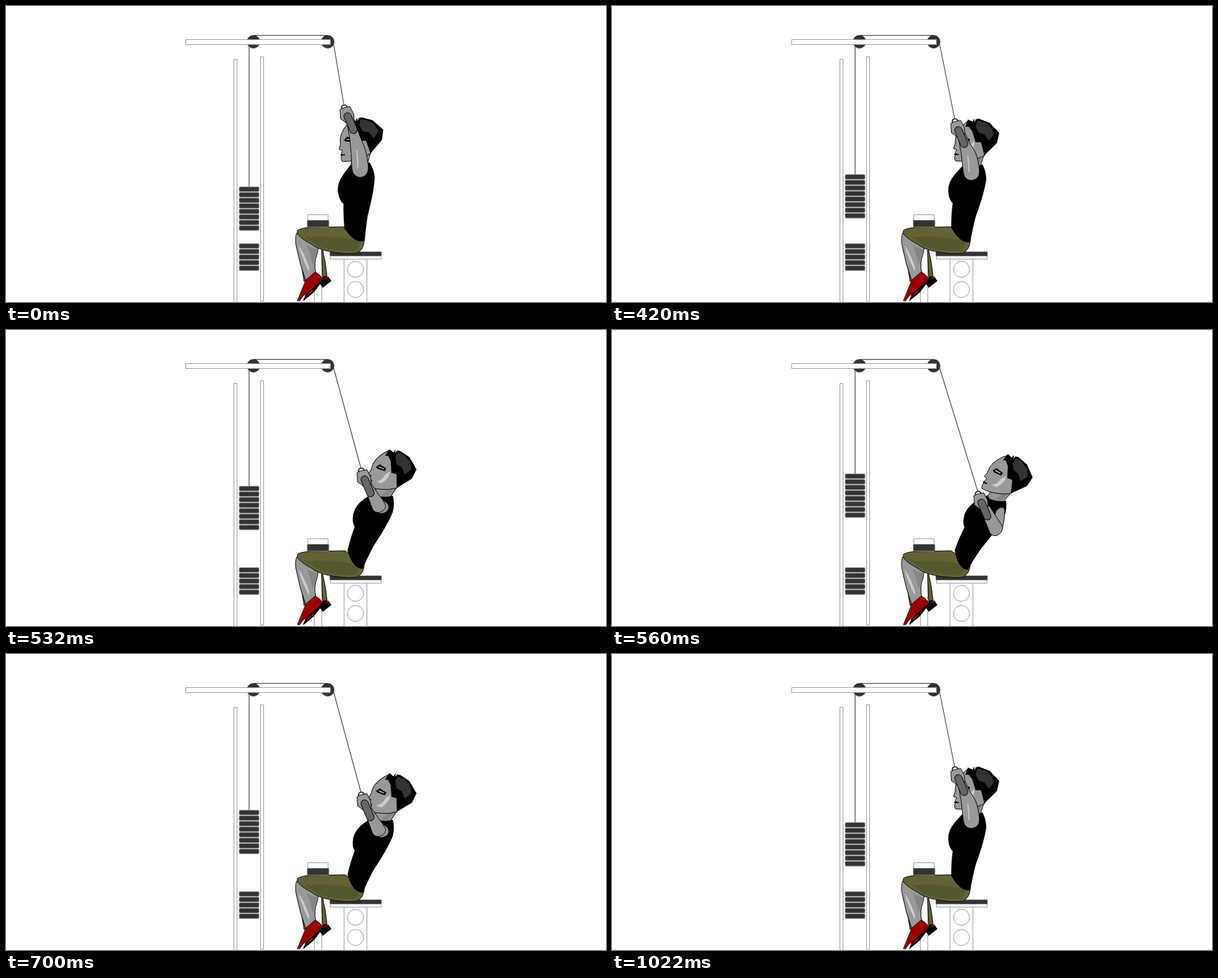
Recreate the animation shown at these times as an HTML page. Size 970 by 480 pixels, loop 1190 ms.

```html
<!DOCTYPE html>
<html lang="en">
<head>
<meta charset="utf-8">
<title>Lat pulldown</title>
<style>
  html, body { margin: 0; width: 100%; height: 100%; overflow: hidden; background: #fff; }
  svg { display: block; }
  .frame { fill: #fff; stroke: #999; }
  .pad { fill: #333; stroke: #888; }
  .cable { fill: none; stroke: #444; stroke-width: 1.2; }
  .skin { fill: #999; stroke: #000; }
  .shade { fill: #858585; }
  .shine { fill: #ccc; }
  .olive { fill: #626235; stroke: #000; }
  .red { fill: #900; stroke: #000; stroke-width: .8; }
</style>
</head>
<body>
<svg width="970" height="480" viewBox="0 0 970 480" stroke-linejoin="round">
  <!-- machine -->
  <g class="frame">
    <rect x="368.5" y="86.5" width="5" height="400"/>
    <rect x="411.5" y="82.5" width="5" height="396"/>
    <rect x="498.5" y="380.5" width="12" height="110"/>
    <rect x="546.5" y="405.5" width="37" height="90"/>
    <circle cx="565" cy="427" r="13"/>
    <circle cx="565" cy="459.7" r="13"/>
    <rect x="524.5" y="405.5" width="82" height="5"/>
  </g>
  <rect class="pad" x="523.5" y="398.5" width="83.5" height="7" rx="1"/>
  <circle cx="400" cy="58" r="10.7" fill="#333"/>
  <circle cx="520" cy="58" r="10.7" fill="#333"/>
  <path class="cable" d="M400 47.7H520"/>
  <path class="cable" id="cable"/>
  <rect class="frame" x="290.5" y="54.5" width="234" height="8"/>
  <g id="lifted"></g>
  <g id="resting" transform="translate(0 385)"></g>

  <!-- legs -->
  <path class="olive" d="M510 396L512 441L519 438Q517 416 512 396ZM474 400L482 447L489 443Z"/>
  <path d="M480 479L484 468L514 438L522 440L526 446L512 457L508 451L498 464Z"/>
  <path class="red" d="M483 474L488 466L497 459V463ZM513 441L521 439V444Z"/>
  <path class="skin" d="M470 368Q466 378 470 393Q475 420 485 446L501 434Q497 416 503 402L505 390Q488 385 480 374Z"/>
  <path class="shade" d="M486 388Q492 401 496 421L503 395Z"/>
  <path class="shine" d="M473 388Q478 408 490 431L490 424Q482 400 473 388Z"/>
  <path d="M489 464L512 442L516 446L511 453L505 450Z"/>
  <path class="red" d="M471 478L484 446L486 443L500 431Q509 436 512 443L490 463Q480 469 475 478Z"/>
  <path class="olive" d="M471 364Q476 360 492 359L548 358L579 378Q580 394 567 401Q543 403 518 397Q502 393 495 387Q475 376 471 369Z"/>
  <path fill="#57572c" d="M477 366Q482 376 492 375Q520 372 550 377L571 380Q571 394 560 397Q535 398 512 392Q500 388 494 381Q482 375 477 366Z"/>
  <rect class="frame" x="487.8" y="338.5" width="33" height="9"/>
  <rect class="pad" x="487" y="347.5" width="35" height="11" rx="1"/>

  <!-- torso and head lean as one -->
  <g id="body">
    <path class="skin" d="M612 262L606 272L612 282H634V277L645 264Z"/>
    <path class="shade" d="M618 275L632 265H642L633 274L628 277Z"/>
    <path class="skin" d="M640 203Q620 209 611 222L607 231L602 237Q603 239 606 240.5L603 244L601 247L598 253V257Q612 265 633 266L645 265L652 230Z"/>
    <path d="M600 245L607 248.5L606 250L600 247.5ZM615 227.5L622 224L632 232L629 236L618 231Z"/>
    <path d="M619.5 227.5L628 232.5" stroke="#ccc" stroke-width="1.6"/>
    <path class="shine" d="M637 237Q636 248 621 255L613 251Q624 250 628 242Z"/>
    <path d="M632 211L640 201L646 207L650 203L649 209L652 205L657 206L671 218L680 239L671 253L645 265L647 243L639 240L640 221L637 212Z"/>
    <path fill="#333" d="M653 208L663 214L671 225L672 238L660 245L657 233L649 227L648 216Z"/>
    <path d="M607 268L611 274Q624 279 637 277Q639 290 634 303Q624 322 597 354Q584 373 575 389Q559 387 554 357Q561 337 570 320Q566 313 570 299Q575 285 590 277Z"/>
  </g>

  <!-- arm -->
  <path class="skin" id="shoulder"/>
  <path class="skin" id="arm"/>
  <path id="gleam" fill="none" stroke="#ccc" stroke-width="1.8"/>
  <g id="grip">
    <circle cx="547" cy="165" r="4.5" fill="none" stroke="#333" stroke-width="2.2"/>
    <path class="skin" d="M540 168L546 165L556 163L562 175L563 186L550 190L547 187L541 183Z"/>
    <rect x="-6" y="-18" width="12" height="36" rx="6" transform="translate(557 190) rotate(-23)" fill="#666" stroke="#000"/>
  </g>
</svg>
<script>
  const $ = id => document.getElementById(id);

  const plates = count => Array.from({ length: count }, (_, i) =>
    `<rect class="pad" x="377" y="${i * 9 + .3}" width="32" height="7.6" rx="1.8"/>`).join('');
  $('lifted').innerHTML = plates(8);
  $('resting').innerHTML = plates(5);

  // lean in degrees, grip offset from the top of the pull, top of the lifted plates
  const poses = {
    stretched: {
      lean: -25.6, grip: [0, 0], stack: 293,
      arm: 'M551 188Q557 215 558 240L559 263Q561 278 574 278Q585 276 586 263Q584 240 579 228L571 208L562 182Z',
      gleam: 'M567 233Q569 248 568.5 264'
    },
    bent: {
      lean: -20.2, grip: [7.7, 22.5], stack: 273,
      arm: 'M559 210Q565 237 566 253L568 270Q570 283 582 283Q595 280 594 267Q592 247 587 236L578 222L569 203Z',
      gleam: 'M575 243Q577.5 256 577 269'
    },
    halfway: {
      lean: -6.6, grip: [27.5, 63.5], stack: 253,
      shoulder: 'M605 275Q619 279 619 288Q617 298 603 298Z',
      arm: 'M577 248L592 289Q595 297 604 296Q613 293 614 285Q610 275 604 269L591 250Z'
    },
    near: {
      lean: -2.4, grip: [39, 90], stack: 243,
      shoulder: 'M613 299Q611 289 619 283Q627 279 629 289Q629 300 626 309Z',
      arm: 'M588 276L603 313Q606 323 614 322Q623 320 626 308L604 274Z'
    },
    pulled: {
      lean: 0, grip: [45, 101], stack: 233,
      shoulder: 'M620 306Q617 296 624 290Q633 284 635 292Q635 307 631 322Z',
      arm: 'M594 287L609 324Q612 335 621 333.5Q630 331 632 320L610 285Z'
    }
  };

  const loop = 1190;
  const schedule = [
    [0, 'stretched'], [420, 'bent'], [490, 'halfway'], [560, 'pulled'],
    [630, 'near'], [700, 'halfway'], [770, 'bent']
  ];

  function show({ lean, grip: [x, y], stack, arm, shoulder = '', gleam = '' }) {
    $('body').setAttribute('transform', `rotate(${lean} 560 374)`);
    $('grip').setAttribute('transform', `translate(${x} ${y})`);
    $('lifted').setAttribute('transform', `translate(0 ${stack})`);
    $('cable').setAttribute('d', `M393 58V${stack}M529.5 61L${546.3 + x} ${160.5 + y}`);
    $('arm').setAttribute('d', arm);
    $('shoulder').setAttribute('d', shoulder);
    $('gleam').setAttribute('d', gleam);
  }

  function tick() {
    const time = performance.now() % loop;
    show(poses[schedule.findLast(([start]) => start <= time)[1]]);
    requestAnimationFrame(tick);
  }
  tick();
</script>
</body>
</html>
```
